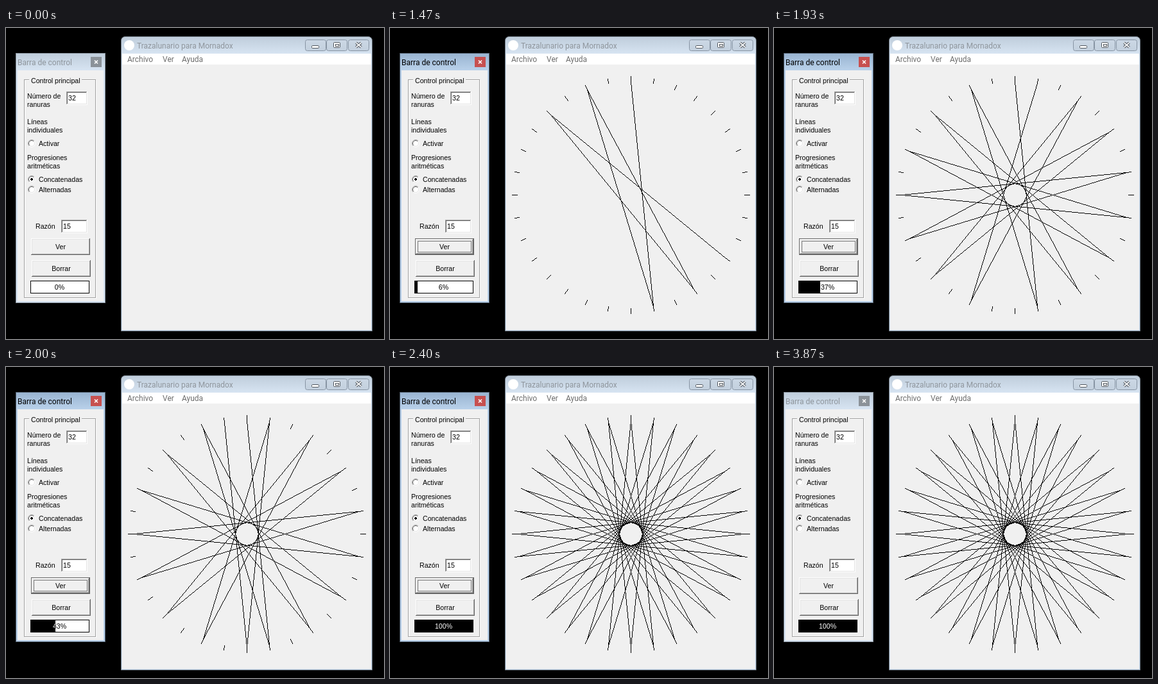
An HTML page with a canvas that plays this animation: 589 by 485 pixels, repeating every 3940 ms.

```html
<!DOCTYPE html>
<html lang="es">
<head>
<meta charset="utf-8">
<title>Trazalunario</title>
<style>
html, body { margin: 0; width: 100%; height: 100%; overflow: hidden; background: #000; }
canvas { display: block; }
</style>
</head>
<body>
<canvas id="stage" width="589" height="485"></canvas>
<script>
const ctx = document.getElementById('stage').getContext('2d');
const LOOP = 3940;
const SLOTS = 32, STEP = 15, CX = 375, CY = 260, OUTER = 185, INNER = 177;
const UI = '10.6px "Liberation Sans", Arial, sans-serif';
const CAPTION = '12px Roboto, "Open Sans", sans-serif';
const FACE = '#f0f0f0';

// Drawing progress: [start ms, chords drawn, percent shown]
const PROGRESS = [
  [0, -1, 0], [1470, 5, 6], [1540, 9, 18], [1600, 13, 31],
  [1930, 15, 37], [2000, 17, 43], [2330, 24, 65], [2400, 32, 100]
];

function box(x, y, w, h, color) {
  ctx.fillStyle = color;
  ctx.fillRect(x, y, w, h);
}

function outline(x, y, w, h, color) {
  ctx.strokeStyle = color;
  ctx.lineWidth = 1;
  ctx.strokeRect(x + .5, y + .5, w - 1, h - 1);
}

function fade(y0, y1, from, to) {
  const g = ctx.createLinearGradient(0, y0, 0, y1);
  g.addColorStop(0, from);
  g.addColorStop(1, to);
  return g;
}

function text(str, x, y, color = '#000', font = UI, align = 'left') {
  ctx.font = font;
  ctx.fillStyle = color;
  ctx.textAlign = align;
  ctx.fillText(str, x, y);
}

function rounded(x, y, w, h, r, fill, stroke) {
  ctx.beginPath();
  ctx.roundRect(x, y, w, h, r);
  ctx.fillStyle = fill;
  ctx.fill();
  if (stroke) {
    ctx.strokeStyle = stroke;
    ctx.lineWidth = 1;
    ctx.stroke();
  }
}

function bevel(x, y, w, h, light, dark) {
  box(x, y, w, 1, light);
  box(x, y, 1, h, light);
  box(x, y + h - 1, w, 1, dark);
  box(x + w - 1, y, 1, h, dark);
}

// One-pixel line without smoothing
function line(x0, y0, x1, y1) {
  const dx = Math.abs(x1 - x0), dy = Math.abs(y1 - y0);
  const sx = Math.sign(x1 - x0), sy = Math.sign(y1 - y0);
  let err = dx - dy;
  ctx.fillStyle = '#000';
  for (;;) {
    ctx.fillRect(x0, y0, 1, 1);
    if (x0 === x1 && y0 === y1) return;
    const e = 2 * err;
    if (e > -dy) { err -= dy; x0 += sx; }
    if (e < dx) { err += dx; y0 += sy; }
  }
}

function slot(i, r) {
  const a = i * 2 * Math.PI / SLOTS;
  return [Math.round(CX + r * Math.sin(a)), Math.round(CY - r * Math.cos(a))];
}

function cross(x, y, rx, ry, color, width) {
  ctx.strokeStyle = color;
  ctx.lineWidth = width;
  ctx.beginPath();
  ctx.moveTo(x - rx, y - ry);
  ctx.lineTo(x + rx, y + ry);
  ctx.moveTo(x + rx, y - ry);
  ctx.lineTo(x - rx, y + ry);
  ctx.stroke();
}

function mainWindow() {
  rounded(179.5, 13.5, 391, 459, [6, 6, 0, 0], fade(14, 40, '#bfcddb', '#d7e4f2'), '#77828d');
  box(181, 39, 388, 18, '#fff');
  box(181, 57, 388, 414, FACE);
  bevel(180, 39, 390, 433, '#d7e4f2', '#c7d8ea');
  ctx.beginPath();
  ctx.arc(192, 27, 8, 0, 7);
  ctx.fillStyle = '#fff';
  ctx.fill();
  text('Trazalunario para Mornadox', 204, 32, '#8e959c', CAPTION);
  text('Archivo', 189, 53, '#6d6d6d', CAPTION);
  text('Ver', 244, 53, '#6d6d6d', CAPTION);
  text('Ayuda', 274, 53, '#6d6d6d', CAPTION);
  for (const x of [466.5, 499.5, 533.5])
    rounded(x, 18.5, 32, 17, 3, fade(18, 36, '#ccd8e5', '#c3d0de'), '#8794a3');
  // Caption glyphs
  rounded(476.5, 27.5, 11, 4, 1, '#fff', '#50565e');
  rounded(510.5, 22.5, 10, 8, 1, '#fff', '#50565e');
  outline(513, 25, 6, 4, '#50565e');
  cross(549.5, 26.5, 4, 3.5, '#50565e', 4);
  cross(549.5, 26.5, 4, 3.5, '#f4f6f8', 1.8);
}

function star(count) {
  for (let i = 0; i < SLOTS; i++) line(...slot(i, INNER), ...slot(i, OUTER));
  for (let i = 0; i < count; i++)
    line(...slot(i * STEP, INNER), ...slot((i + 1) * STEP, INNER));
}

function field(x, y, w, value) {
  box(x, y, w, 21, '#fff');
  bevel(x, y, w, 21, '#a0a0a0', '#fff');
  bevel(x + 1, y + 1, w - 2, 19, '#696969', '#e3e3e3');
  text(value, x + 3, y + 14);
}

function radio(y, label, on) {
  const ring = (r, start, color) => {
    ctx.beginPath();
    ctx.arc(40, y, r, start, start + Math.PI);
    ctx.strokeStyle = color;
    ctx.lineWidth = 1;
    ctx.stroke();
  };
  ctx.beginPath();
  ctx.arc(40, y, 5, 0, 7);
  ctx.fillStyle = '#fff';
  ctx.fill();
  ring(5.5, Math.PI * .75, '#a0a0a0');
  ring(5.5, -Math.PI * .25, '#fff');
  ring(4.5, Math.PI * .75, '#696969');
  ring(4.5, -Math.PI * .25, '#e3e3e3');
  if (on) {
    box(38, y - 1, 4, 2, '#000');
    box(39, y - 2, 2, 4, '#000');
  }
  text(label, 51, y + 4);
}

function button(x, y, label, focus, down) {
  const w = 92, h = 26;
  box(x, y, w, h, FACE);
  if (down) {
    outline(x, y, w, h, '#646464');
    outline(x + 1, y + 1, w - 2, h - 2, '#a0a0a0');
  } else {
    const d = focus ? 1 : 0;
    if (focus) outline(x, y, w, h, '#646464');
    bevel(x + d, y + d, w - 2 * d, h - 2 * d, '#fff', '#696969');
    bevel(x + d + 1, y + d + 1, w - 2 * d - 2, h - 2 * d - 2, '#e3e3e3', '#a0a0a0');
  }
  if (focus) {
    ctx.setLineDash([1, 1]);
    outline(x + 4, y + 4, w - 8, h - 8, '#000');
    ctx.setLineDash([]);
  }
  const o = down ? 1 : 0;
  text(label, x + 46 + o, y + 17 + o, '#000', UI, 'center');
}

function meter(percent) {
  const x = 38, y = 394, w = 92, h = 20, fill = Math.floor(w * percent / 100);
  const label = percent + '%';
  box(x, y, w, h, '#fff');
  outline(x, y, w, h, '#000');
  text(label, 83.5, 408, '#000', UI, 'center');
  ctx.save();
  ctx.beginPath();
  ctx.rect(x, y, fill, h);
  ctx.clip();
  box(x, y, w, h, '#000');
  text(label, 83.5, 408, '#fff', UI, 'center');
  ctx.restore();
}

function panel(active, focus, down, percent) {
  const edge = active ? '#b9d1ea' : '#d7e4f2';
  box(15, 39, 140, 390, active ? '#566473' : '#8a949e');
  box(16, 40, 138, 388, edge);
  box(16, 40, 138, 26, fade(40, 66, active ? '#99b4d1' : '#bfcddb', edge));
  box(18, 66, 134, 360, FACE);
  text('Barra de control', 18, 58, active ? '#000' : '#8e959c', CAPTION);
  box(132, 45, 17, 16, active ? '#c75050' : '#8b9299');
  cross(140.5, 53, 2.5, 2.5, '#fff', 1.6);

  outline(29, 81, 112, 341, '#fff');
  outline(28, 80, 112, 341, '#a0a0a0');
  box(36, 79, 82, 4, FACE);
  text('Control principal', 39, 86);
  text('Número de', 33, 110);
  text('ranuras', 33, 123);
  field(94, 99, 33, '32');
  text('Líneas', 33, 150);
  text('individuales', 33, 163);
  radio(180, 'Activar', false);
  text('Progresiones', 33, 206);
  text('aritméticas', 33, 219);
  radio(236, 'Concatenadas', true);
  radio(252, 'Alternadas', false);
  text('Razón', 46, 313);
  field(86, 299, 41, '15');
  button(39, 328, 'Ver', focus, down);
  button(40, 362, 'Borrar', false, false);
  meter(percent);
}

function draw(t) {
  const [, chords, percent] = PROGRESS.findLast(p => t >= p[0]);
  box(0, 0, 589, 485, '#000');
  mainWindow();
  if (chords >= 0) star(chords);
  panel(t >= 1270 && t < 3800, t >= 1270 && t < 3870, t >= 1270 && t < 1470, percent);
}

const start = performance.now();
function tick() {
  draw((performance.now() - start) % LOOP);
  requestAnimationFrame(tick);
}
tick();
</script>
</body>
</html>
```
